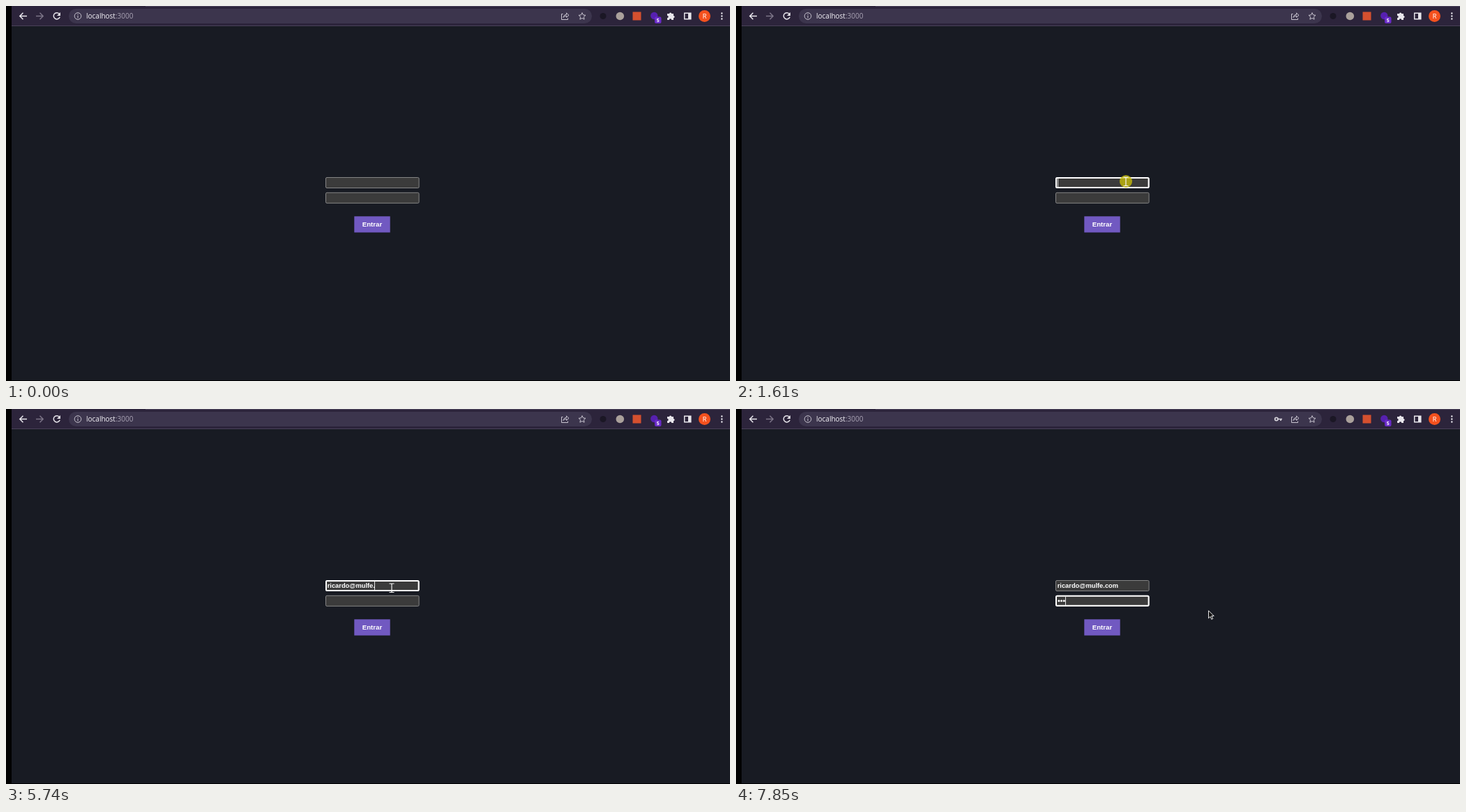
Write an HTML page that moves like this. It is 1038x539 px and loops after 8 s.

```html
<!DOCTYPE html>
<html lang="pt">
<head>
<meta charset="utf-8">
<title>Login</title>
<style>
  html, body { margin: 0; width: 100%; height: 100%; overflow: hidden; background: #000; }
  svg { display: block; }
  .line { fill: none; stroke: #e8e6ec; stroke-width: 1.5; }
  .thin { fill: none; stroke: #c9c5d0; stroke-width: 1; }
  .url { font: 10px "Open Sans", "Noto Sans", sans-serif; fill: #f4f2f7; }
  .form { font: bold 9.33px "Liberation Sans", Arial, sans-serif; fill: #fff; }
  .field rect { fill: #3b3b3b; stroke: #858585; }
  .field .ring { fill: none; stroke: #fff; stroke-width: 2; visibility: hidden; }
  .hover rect { stroke: #b4b4b4; }
  .focus .ring { visibility: visible; }
</style>
</head>
<body>
<svg width="1038" height="539" viewBox="0 0 1038 539">
  <path fill="#181b23" d="M8 0H1038V538H8Z"/>
  <path fill="#2c243b" d="M8 0H1038V28H8Z"/>
  <path fill="#4a4259" d="M200 0H1038V1H200ZM8 28H1038V29H8Z"/>

  <!-- toolbar: navigation and address -->
  <path class="line" d="M30 14.5H20M24.5 9.8L19.8 14.5L24.5 19.2"/>
  <path class="line" style="stroke:#7b7487" d="M43 14.5H53M48.5 9.8L53.2 14.5L48.5 19.2"/>
  <path class="line" d="M76.3 11.2A4.6 4.6 0 1 0 77.2 15.8"/>
  <path fill="#e8e6ec" d="M78 9V14H73Z"/>
  <rect x="90" y="4" width="750" height="21" rx="10.5" fill="#3c354d"/>
  <circle class="thin" cx="103" cy="14.5" r="4.8"/>
  <path class="thin" d="M103 13.8V17.3M103 11.5V12.7"/>
  <text class="url" x="115" y="18">localhost<tspan fill="#aaa4b5">:3000</tspan></text>

  <g id="key" fill="none" stroke="#d5d2da" stroke-width="1.7">
    <circle cx="774.8" cy="14.5" r="2.2"/>
    <path d="M777 14.5H783M781 14.5V17"/>
  </g>
  <path class="thin" d="M798.5 11.5H796.5V19.5H805.5V17.5M799 16.5C799.5 13.5 801.5 12.3 803.5 12.3V10L807 13.3L803.5 16.3V14.2C801.5 14.2 800 15 799 16.5Z"/>
  <path class="thin" d="M826 9.6L827.5 12.9L831 13.3L828.4 15.7L829.1 19.2L826 17.4L822.9 19.2L823.6 15.7L821 13.3L824.5 12.9Z"/>

  <!-- toolbar: extensions and menu -->
  <circle cx="856" cy="14.5" r="4.5" fill="#1b1725"/>
  <circle cx="880.3" cy="14.5" r="5.8" fill="#aaa09b"/>
  <rect x="898.5" y="8.5" width="12" height="12" fill="#d5502f"/>
  <circle cx="929.3" cy="14" r="5.2" fill="#5620b0"/>
  <rect x="930" y="15.5" width="9.5" height="9.5" rx="2" fill="#6a2cc8"/>
  <text x="934.7" y="23" text-anchor="middle" fill="#fff" style="font:bold 7px 'Open Sans',sans-serif">5</text>
  <path fill="#e8e6ec" d="M948 11H951A1.6 1.6 0 0 1 954.2 11H957V14A1.6 1.6 0 0 1 957 17.2V20H954.2A1.7 1.7 0 0 0 950.8 20H948V17.2A1.7 1.7 0 0 0 948 13.8Z"/>
  <path class="line" d="M972.7 10.2H981.8V18.8H972.7Z"/>
  <path fill="#e8e6ec" d="M978 10H982V19H978Z"/>
  <circle cx="1001.5" cy="14.5" r="8.5" fill="#f4511e"/>
  <text x="1001.5" y="17.7" text-anchor="middle" fill="#fff" style="font:9px Roboto,sans-serif">R</text>
  <path d="M1026.3 10.5v0m0 4v0m0 4v0" stroke="#e8e6ec" stroke-width="2.4" stroke-linecap="round"/>

  <!-- form -->
  <g id="mail" class="field">
    <rect x="458.5" y="246.5" width="133.6" height="15" rx="1.5"/>
    <rect class="ring" x="459" y="247" width="132.6" height="14" rx="1.5"/>
  </g>
  <g id="pass" class="field">
    <rect x="458.5" y="268.3" width="133.6" height="15" rx="1.5"/>
    <rect class="ring" x="459" y="268.8" width="132.6" height="14" rx="1.5"/>
  </g>
  <circle id="click" cx="559" cy="252" r="9" fill="#c8be08" fill-opacity=".78"/>
  <text id="typed" class="form" x="460.7" y="257.3"></text>
  <path id="dots" stroke="#fff" stroke-width="3" stroke-linecap="round"/>
  <path id="caret" d="M0 0V12" stroke="#e6e6e6"/>
  <rect x="499.3" y="302.3" width="51.4" height="23.2" fill="#7159c1"/>
  <text class="form" x="525" y="317.3" text-anchor="middle" style="font-size:9.7px">Entrar</text>

  <path id="arrow" d="M.5 .8V11.8L3 9.4L4.8 13.3L6.6 12.5L4.8 8.5H8.2Z" fill="#111" stroke="#fff" stroke-width=".9"/>
  <path id="beam" d="M-3.5 -6H-1Q0 -6 0 -5Q0 -6 1 -6H3.5M0 -5V5.5M-3.5 6.5H-1Q0 6.5 0 5.5Q0 6.5 1 6.5H3.5" fill="none" stroke="#f2f2f2" stroke-width="1.2"/>
</svg>
<script>
const LOOP = 8000, CLICK = 1610, TAB = 7050, FIRST_DOT = 7450;
const $ = id => document.getElementById(id);
const show = (el, on) => el.setAttribute("visibility", on ? "visible" : "hidden");
const place = (el, x, y) => el.setAttribute("transform", `translate(${x} ${y})`);

// Each burst of typing spreads its letters evenly from first to last key press.
const bursts = [
  { text: "ricardo", first: 3110, last: 3620 },
  { text: "@", first: 4330, last: 4330 },
  { text: "mulfe", first: 4930, last: 5130 },
  { text: ".", first: 5740, last: 5740 },
  { text: "com", first: 6030, last: 6250 }
];
const keys = bursts.flatMap(({ text, first, last }) => [...text].map((letter, i) =>
  ({ letter, time: first + (last - first) * i / Math.max(1, text.length - 1) })));
const dotTimes = [0, 1, 2].map(i => FIRST_DOT + 200 * i);
const presses = [CLICK, ...keys.map(k => k.time), TAB, ...dotTimes];

// Pointer strokes: quadratic curves, slowing down by the given power.
const moves = [
  { start: 190, end: 790, from: [1014, 411], via: [720, 110], to: [581, 234], power: 1 },
  { start: 790, end: 1210, from: [581, 234], to: [559, 252], power: 1 },
  { start: CLICK, end: 1810, from: [559, 252], to: [553, 257], power: 1 },
  { start: 6900, end: 7450, from: [553, 257], to: [677, 289], power: 4 }
];

function pointerAt(t) {
  const move = moves.findLast(m => m.start <= t);
  if (!move) return [-50, -50];
  const { start, end, from, to, power } = move;
  const u = 1 - (1 - Math.min(1, (t - start) / (end - start))) ** power;
  return from.map((a, i) => {
    const b = to[i], c = move.via ? move.via[i] : (a + b) / 2;
    return a * (1 - u) ** 2 + 2 * c * u * (1 - u) + b * u * u;
  });
}

function draw(t) {
  const [x, y] = pointerAt(t);
  const over = x > 458 && x < 593 && y < 262;
  const inField = over && y > 246;
  const onPass = t >= TAB, onMail = t >= CLICK && !onPass;
  $("mail").classList.toggle("focus", onMail);
  $("mail").classList.toggle("hover", over && y > 232);
  $("pass").classList.toggle("focus", onPass);

  const typed = keys.filter(k => k.time <= t).map(k => k.letter).join("");
  const dots = dotTimes.filter(time => time <= t).length;
  $("typed").textContent = typed;
  $("dots").setAttribute("d", "M459.2 275.8" + "m3.7 0v0".repeat(dots));

  const width = typed ? $("typed").getComputedTextLength() : 0;
  const caretX = onPass ? 461 + 3.8 * dots : Math.max(461, 460.7 + width);
  const idle = t - presses.findLast(time => time <= t);
  place($("caret"), Math.floor(caretX) + .5, onPass ? 270 : 248);
  show($("caret"), idle % 1100 < 500);

  place($("arrow"), x, y);
  place($("beam"), x, y);
  show($("arrow"), !inField);
  show($("beam"), inField);
  show($("click"), t >= CLICK && t < CLICK + 100);
  show($("key"), t >= FIRST_DOT);
}

function tick() {
  draw(performance.now() % LOOP);
  requestAnimationFrame(tick);
}
tick();
</script>
</body>
</html>
```
